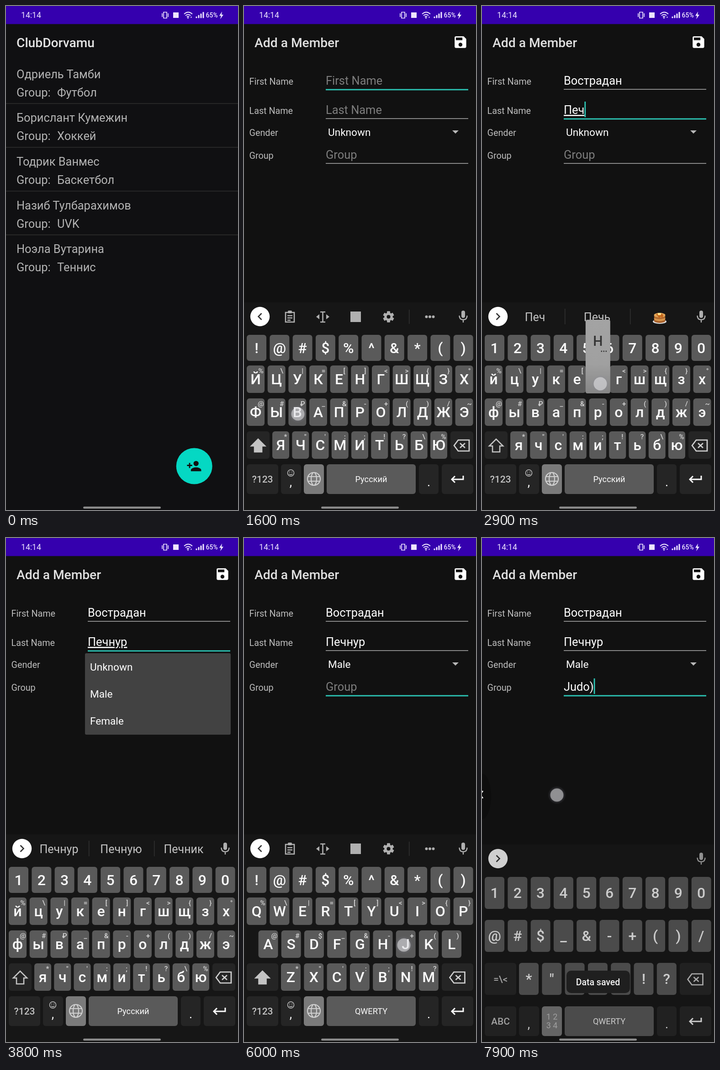
An HTML page for the animation above (8 s loop, 508 px wide and 1102 px high).

```html
<!DOCTYPE html>
<html lang="ru">
<head>
<meta charset="utf-8">
<title>Member form</title>
<style>
html, body { margin: 0; width: 100%; height: 100%; overflow: hidden; background: #111; }
svg { display: block; width: 100vw; height: 100vh; }
text { font-family: Roboto, "Noto Sans", sans-serif; white-space: pre; }
.key { font-weight: 500; }
</style>
</head>
<body>
<svg id="stage" viewBox="0 0 508 1102"></svg>
<script>
const LOOP = 8000, STEP = 100, TEAL = '#2cc6b6';
const stage = document.getElementById('stage');

// Markup helpers
const esc = s => s.replace(/&/g, '&amp;').replace(/</g, '&lt;');
const text = (x, y, s, size, fill, more = '') =>
  `<text x="${x}" y="${y}" font-size="${size}" fill="${fill}" ${more}>${esc(s)}</text>`;
const mid = (x, cy, s, size, fill, more = '') =>
  text(x, cy + size * 0.355, s, size, fill, 'text-anchor="middle" ' + more);
const rect = (x, y, w, h, fill, r = 0, more = '') =>
  `<rect x="${x}" y="${y}" width="${w}" height="${h}" rx="${r}" fill="${fill}" ${more}/>`;
const circle = (x, y, r, fill, more = '') =>
  `<circle cx="${x}" cy="${y}" r="${r}" fill="${fill}" ${more}/>`;
const line = (d, color, w, more = '') =>
  `<path d="${d}" fill="none" stroke="${color}" stroke-width="${w}" ${more}/>`;
const shape = (d, fill, more = '') => `<path d="${d}" fill="${fill}" ${more}/>`;
const group = (id, body, more = '') => `<g id="${id}" ${more}>${body}</g>`;
const at = (x, y, body, k = 1) => `<g transform="translate(${x} ${y}) scale(${k})">${body}</g>`;

// Status bar
function statusBar() {
  const c = '#eee6ff';
  const bars = [0, 1, 2, 3].map(i => rect(415.5 + i * 5, 23 - i * 3.3, 3, 3.5 + i * 3.3, c, 1)).join('');
  return rect(0, 0, 508, 39.5, '#3500ae') + text(33, 26.2, '14:14', 17.6, c) +
    line('M345 13.5h7v13h-7zM342 16v8M355 16v8', c, 1.7) +
    rect(366, 14, 12, 12, c) +
    line('M390 17.5q9 -8 18 0M393 21q6 -5 11 0M396 24q3 -2.5 5 0', c, 1.9) +
    circle(398.5, 26, 1.5, c) + circle(405.5, 24.5, 1.2, c) + bars +
    text(437.5, 24.5, '65%', 14, c, 'font-weight="500"') +
    shape('M473 12l-6 9.5h4l-2 7.5 7-10h-4z', c);
}

// List screen
const people = [
  ['Одриель Тамби', 'Футбол'], ['Борислант Кумежин', 'Хоккей'], ['Тодрик Ванмес', 'Баскетбол'],
  ['Назиб Тулбарахимов', 'UVK'], ['Ноэла Вутарина', 'Теннис']
];
function listScreen() {
  const c = '#b4b4b4';
  const rows = people.map(([name, sport], i) => {
    const y = i * 95.7;
    return text(23, 157.6 + y, name, 25.4, c) + text(23, 197.6 + y, 'Group:', 25.4, c) +
      text(112, 197.6 + y, sport, 25.4, c) + (i < 4 ? rect(0, 212.5 + y, 508, 1.6, '#2d2d2d') : '');
  }).join('');
  const add = 'M15 12a4 4 0 1 0 0-8 4 4 0 0 0 0 8zM6 10V7H4v3H1v2h3v3h2v-3h3v-2zM15 14c-2.7 0-8 1.3-8 4v2h16v-2c0-2.7-5.3-4-8-4z';
  return rect(0, 0, 508, 1102, '#101012') + text(23, 90, 'ClubDorvamu', 28.2, '#e4e4e4', 'font-weight="500"') +
    rows + circle(412.2, 1006, 39.5, '#05d8c3') + at(395, 989, shape(add, '#111'), 1.411);
}

// Form screen
const fields = [
  { label: 'First Name', base: 172, rule: 181.5 },
  { label: 'Last Name', base: 236, rule: 245.5 },
  { label: 'Group', base: 334, rule: 343.5 }
];
function formScreen() {
  const save = 'M17 3H5a2 2 0 0 0-2 2v14a2 2 0 0 0 2 2h14a2 2 0 0 0 2-2V7zM12 19a3 3 0 1 1 0-6 3 3 0 0 1 0 6zM15 9H5V5h10z';
  return rect(0, 0, 508, 1102, '#111') + text(23, 90, 'Add a Member', 28.2, '#e0e0e0', 'font-weight="500"') +
    at(457, 62, shape(save, '#fff', 'fill-rule="evenodd"'), 1.411) +
    fields.map((f, i) => text(11.5, f.base - 0.5, f.label, 19.76, '#bcbcbc') +
      text(179, f.base, '', 25.4, '#fff', `id="value${i}"`) +
      rect(179, f.rule, 312, 1.4, '#b8b8b8', 0, `id="rule${i}"`)).join('') +
    text(11.5, 283.5, 'Gender', 19.76, '#bcbcbc') + text(184, 284, '', 22.6, '#fff', 'id="gender"') +
    shape('M456 272h14l-7 7z', '#b8b8b8') + rect(0, 0, 2.8, 34, TEAL, 0, 'id="caret"');
}
const menu = () => rect(173, 252, 319, 178, '#424242', 3) +
  ['Unknown', 'Male', 'Female'].map((s, i) => text(184, 290 + i * 59, s, 22.6, '#fff')).join('');

// Keyboard
const KEY = '#5a5a5a', DARK = '#252525', INK = '#fafafa', GREY = '#b0b0b0', BOLD = 'class="key"';
const keyBox = {};
const keyRow = (labels, x, step, w, y, h, hints = []) => [...labels].map((s, i) => {
  const kx = x + i * step;
  keyBox[s] = [kx, y, w];
  return rect(kx, y, w, h, KEY, 6) + mid(kx + w / 2, y + h / 2, s, 32, INK, BOLD) +
    (hints[i] ? mid(kx + w - 8, y + 11, hints[i], 15.5, '#d4d4d4', BOLD) : '');
}).join('');
const shiftKey = (w, on) => rect(6, 930, w, 60, DARK, 6) +
  at(6 + w / 2, 961, `<path d="M0 -14L-15 1H-8V14H8V1H15Z" fill="${on ? '#c4c4c4' : 'none'}" stroke="#c4c4c4" stroke-width="2.6"/>`);
const backKey = (x, y, h) => rect(x, y, 502 - x, h, DARK, 6) +
  at((x + 502) / 2, y + h / 2 + 1, line('M-17 0L-8 -12H16V12H-8ZM-4 -5L7 5M7 -5L-4 5', '#d0d0d0', 2.7));
function bottomRow(left, label, symbols) {
  const g = '#c4c4c4';
  return rect(6, 1002, 69, 65, DARK, 6) + mid(40.5, 1035, left, 21, g, BOLD) +
    rect(81, 1002, 44, 65, DARK, 6) + text(102.5, 1050, ',', 27, INK, 'text-anchor="middle"') +
    rect(131, 1002, 44, 65, '#7a7a7a', 6) +
    (symbols ? mid(153, 1025, '1 2', 18, g) + mid(153, 1044, '3 4', 18, g)
      : line('M139 1034a14 14 0 1 0 28 0a14 14 0 1 0 -28 0M147 1034a6 14 0 1 0 12 0a6 14 0 1 0 -12 0M141 1029h24M141 1039h24', '#d0d0d0', 2.2) +
        circle(102.5, 1021, 7, 'none', `stroke="${g}" stroke-width="1.5"`) + line('M99 1023q3.5 4 7 0M100 1018v2M105 1018v2', g, 1.5)) +
    rect(181, 1002, 195, 65, KEY, 6) + mid(278.5, 1035, label, 18.2, INK) +
    rect(383, 1002, 43, 65, DARK, 6) + text(404.5, 1050, '.', 27, INK, 'text-anchor="middle"') +
    rect(433, 1002, 69, 65, DARK, 6) + line('M480 1027v8h-25m7 -7l-7 7l7 7', INK, 3);
}
const topKeys = caps => keyRow(caps ? '!@#$%^&*()' : '1234567890', 6, 50.3, 43, 719, 57);
function russian(caps) {
  const c = s => caps ? s.toUpperCase() : s;
  return topKeys(caps) + keyRow(c('йцукенгшщзх'), 6, 45.66, 39, 786, 60, '%\\|=[]<>{}°') +
    keyRow(c('фывапролджэ'), 6, 45.66, 39, 858, 60, '@#₽_&-+()/~') +
    shiftKey(50, caps) + keyRow(c('ячсмитьбю'), 62, 43.25, 37, 930, 60, '*"\':;!?\\%') +
    backKey(452, 930, 60) + bottomRow('?123', 'Русский');
}
function latin(caps) {
  const c = s => caps ? s.toUpperCase() : s;
  return topKeys(caps) + keyRow(c('qwertyuiop'), 6, 50.3, 43, 786, 60, '%\\|=[]<>{}') +
    keyRow(c('asdfghjkl'), 31.5, 50.2, 43, 858, 60, '@#$_&-+()') +
    shiftKey(69, caps) + keyRow(c('zxcvbnm'), 81, 50.3, 43, 930, 60, '*"\':;!?') +
    backKey(433, 930, 60) + bottomRow('?123', 'QWERTY');
}
const symbols = () => keyRow('1234567890', 6, 50.3, 43, 719, 70) + keyRow('@#$_&-+()/', 6, 50.3, 43, 813, 70) +
  rect(6, 907, 69, 70, DARK, 6) + mid(40.5, 943, '=\\<', 21, '#c4c4c4', BOLD) +
  keyRow('*"\':;!?', 81, 50.3, 43, 907, 70) + backKey(433, 907, 70) + bottomRow('ABC', 'QWERTY', true);

function tools() {
  const teeth = [0, 60, 120].map(a => rect(-3.4, -12.2, 6.8, 24.4, GREY, 1, `transform="rotate(${a})"`)).join('');
  return line('M91 670h19v21h-19zM95 677h11M95 682h11M95 687h7', GREY, 2.6) + rect(96, 666, 9, 6, GREY, 2) +
    line('M172.5 669v22M167 669h11M167 691h11', GREY, 2.6) + shape('M165 674v11l-7 -5.5zM180 674v11l7 -5.5z', GREY) +
    rect(233, 668, 23, 23, GREY) +
    at(316.5, 679.5, teeth + circle(0, 0, 9.2, GREY) + circle(0, 0, 4, '#161616')) +
    rect(361, 664, 1.4, 31, '#333') + [399.5, 407, 414.5].map(x => circle(x, 679.5, 3, GREY)).join('');
}
const pancakes = () => at(389, 682, `<ellipse cy="8" rx="15" ry="5" fill="#dadada"/>` +
  ['#a8602a', '#d9964a', '#b06a30', '#e0a458'].map((c, i) => `<ellipse cy="${6 - i * 4}" rx="12.5" ry="5" fill="${c}"/>`).join('') +
  shape('M-8 -8q8 -4 16 1l-2 8l-3 -4l-4 3z', '#c4651a') + rect(-4, -11, 7, 5, '#ffe08a', 1));
const suggestions = () => [116, 252, 389].map((x, i) => text(x, 689, '', 25, '#c4c4c4', `id="word${i}" text-anchor="middle"`)).join('') +
  rect(181, 662, 1.4, 34, '#333') + rect(324, 662, 1.4, 34, '#333') + group('cakes', pancakes());

const layouts = { ru: russian(false), RU: russian(true), en: latin(false), EN: latin(true), sym: symbols() };
const keyboard = () => rect(0, 648, 508, 454, '#161616') +
  circle(35, 679, 21.2, '#fff') + line('', '#333', 2.6, 'id="chevron"') +
  rect(476, 666, 8, 16, GREY, 4) + line('M471.5 677q0 9 8.5 9t8.5 -9M480 686v6', GREY, 2.4) +
  group('tool', tools()) + group('sug', suggestions()) +
  Object.entries(layouts).map(([id, body]) => group(id, body)).join('') +
  group('popup', rect(-27, -100, 54, 161, 'url(#pop)', 4) + mid(0, -57, '', 40, '#333', 'id="popChar"') +
    [8, 13, 18].map(x => circle(x, -31, 1.4, '#333')).join(''));

stage.innerHTML = `<defs>
  <linearGradient id="pop" x2="0" y2="1"><stop stop-color="#a3a3a3"/><stop offset=".6" stop-color="#a0a0a0"/><stop offset="1" stop-color="#868686"/></linearGradient>
  <radialGradient id="halo"><stop offset=".6" stop-color="#889" stop-opacity=".3"/><stop offset="1" stop-color="#889" stop-opacity="0"/></radialGradient></defs>` +
  group('list', listScreen()) + group('form', formScreen()) + group('menu', menu()) + group('keys', keyboard()) +
  group('toast', rect(185, 946, 139, 49, '#1f1f1f', 10) + mid(254, 971, 'Data saved', 19.5, '#f4f4f4', 'font-weight="500"')) +
  group('back', `<ellipse cx="0" cy="565" rx="20" ry="50" fill="#000" opacity=".25"/>` + line('M2 553L-4 561L2 569', '#fff', 2.4)) +
  rect(169, 1094.5, 170, 4.6, '#8c8c8c', 2.3) + statusBar() +
  group('dot', circle(0, 0, 20, 'url(#halo)') + circle(0, 0, 14.5, '#fff', 'opacity=".45"'));

const el = {};
stage.querySelectorAll('[id]').forEach(n => el[n.id] = n);

// Timelines: [start, value...]
const layoutAt = [[0, 'ru'], [1600, 'RU'], [1800, 'ru'], [2500, 'RU'], [2700, 'ru'], [5300, 'en'], [5700, 'EN'], [6200, 'en'], [6600, 'sym']];
const stripAt = [[0, 'tool'], [1800, 'sug'], [2200, 'tool'], [2700, 'sug'], [4700, 'tool'], [6200, 'sug'], [6800, 'none']];
const wordsAt = [[0, 'В', 'Во', 'Вы'], [1900, 'Во', 'Вот', 'Вода'], [2000, 'Вос', 'Вострадан', 'Восемь'], [2700, 'П', 'По', 'При'],
  [2800, 'Пе', 'Перед', 'Пен'], [2900, 'Печ', 'Печь', ''], [3000, 'Печн', 'Печной', 'Печник'], [3200, 'Печну', 'Печную', 'Печь'],
  [3300, 'Печнур', 'Печную', 'Печник'], [6200, 'J', 'Just', 'Jump'], [6300, 'Ju', 'Just', 'June'], [6400, 'Jud', 'Judge', 'Judo'], [6500, 'Judo', 'Judge', 'Jude']];
const focusAt = [[0, 0], [2200, 1], [4700, 2]];
const typed = [
  [[0, ''], [1800, 'В'], [1900, 'Во'], [2000, 'Вос'], [2100, 'Вострадан']],
  [[0, ''], [2700, 'П'], [2800, 'Пе'], [2900, 'Печ'], [3000, 'Печн'], [3200, 'Печну'], [3300, 'Печнур']],
  [[0, ''], [6200, 'J'], [6300, 'Ju'], [6400, 'Jud'], [6500, 'Judo'], [6800, 'Judo)']]
];
const blinkFrom = [[0, 0], [1000, 1000], [1800, 1800], [2100, 2100], [2200, 1700], [2500, 2500], [2900, 2900], [3300, 3300],
  [4700, 4700], [5300, 5300], [6200, 6200], [6500, 6500], [6800, 6800]];
// Touches: [start, x, y, key]
const taps = [[200, 412, 1006], [1000, 255, 157], [1500, 32, 962], [1600, 118, 892, 'В'], [1700, 300, 892, 'о'], [1800, 168, 964, 'с'],
  [2000, 254, 682], [2150, 270, 228], [2450, 32, 962], [2500, 210, 892, 'П'], [2600, 210, 820, 'е'], [2700, 126, 964, 'ч'],
  [2800, 259, 826, 'н'], [3000, 119, 822, 'у'], [3100, 256, 893, 'р'], [3500, 318, 277], [4500, 270, 341], [4600, 318, 320],
  [5100, 153, 1036], [5600, 41, 962], [6000, 350, 890, 'J'], [6100, 330, 820, 'u'], [6200, 154, 892, 'd'], [6300, 432, 820, 'o'],
  [6450, 42, 1036], [6600, 432, 852, ')'], [7200, 474, 80]];

const last = (table, t) => table.findLast(e => e[0] <= t);
const span = (t, a, b) => Math.min(1, Math.max(0, (t - a) / (b - a)));
const out = p => 1 - (1 - p) ** 3;
const show = (n, on) => n.style.display = on ? '' : 'none';
const set = (n, attrs) => { for (const k in attrs) n.setAttribute(k, attrs[k]); };

function drawForm(t, strip) {
  const focus = last(focusAt, t)[1];
  fields.forEach((f, i) => {
    const s = last(typed[i], t)[1], on = i === focus, v = el['value' + i];
    v.textContent = s || f.label;
    set(v, { fill: s ? '#fff' : '#7d7d7d', 'text-decoration': s && on && strip === 'sug' ? 'underline' : 'none' });
    set(el['rule' + i], { height: on ? 2.8 : 1.4, fill: on ? TEAL : '#b8b8b8' });
    if (on) set(el.caret, { x: 179 + (s ? v.getComputedTextLength() : 0), y: f.base - 27 });
  });
  el.gender.textContent = t < 4600 ? 'Unknown' : 'Male';
  show(el.caret, (t - last(blinkFrom, t)[1]) % 1000 < 500 && !(t >= 3600 && t < 4700));
  const open = out(span(t, 3500, 3800)) * (1 - span(t, 4500, 4700));
  set(el.menu, { opacity: open, transform: `translate(0 ${252 * (1 - open) * 0.15}) scale(1 ${0.85 + 0.15 * open})` });
  show(el.menu, open > 0);
}

function drawKeys(t, strip) {
  const drop = t < 7800 ? 110 * (1 - out(span(t, 1200, 1600))) : (t - 7800) * 0.22;
  set(el.keys, { transform: `translate(0 ${drop})`, opacity: 1 - drop / 110 });
  const layout = last(layoutAt, t)[1];
  Object.keys(layouts).forEach(id => show(el[id], id === layout));
  show(el.tool, strip === 'tool');
  show(el.sug, strip === 'sug');
  set(el.chevron, { d: strip === 'tool' ? 'M38.5 672l-7 7l7 7' : 'M31.5 672l7 7l-7 7' });
  const words = last(wordsAt, t).slice(1);
  words.forEach((w, i) => el['word' + i].textContent = w);
  show(el.cakes, !words[2]);
  const held = taps.find(p => p[3] && p[0] === t - STEP);
  show(el.popup, held);
  if (held) {
    const [x, y, w] = keyBox[held[3]];
    set(el.popup, { transform: `translate(${x + w / 2} ${y})` });
    el.popChar.textContent = held[3];
  }
}

function drawTouch(t) {
  const swipe = t >= 7800;
  const tap = swipe ? [7800, 66 + (t - 7800) * 0.98, 562] : taps.findLast(p => p[0] <= t && t < p[0] + 300);
  show(el.dot, tap);
  show(el.back, t >= 7900);
  if (tap) set(el.dot, { transform: `translate(${tap[1]} ${tap[2]})`, opacity: t - tap[0] < 200 ? 1 : 0.04 });
}

function draw(t) {
  const slide = out(span(t, 300, 900)), strip = last(stripAt, t)[1];
  set(el.list, { transform: `translate(${-127 * slide} 0)`, opacity: 1 - 0.5 * slide });
  set(el.form, { transform: `translate(${508 * (1 - slide)} 0)` });
  show(el.list, slide < 1);
  show(el.form, slide > 0);
  drawForm(t, strip);
  drawKeys(t, strip);
  drawTouch(t);
  set(el.toast, { opacity: span(t, 7300, 7600) });
}

const start = performance.now();
function tick() {
  draw(Math.floor((performance.now() - start) % LOOP / STEP) * STEP);
  requestAnimationFrame(tick);
}
tick();
</script>
</body>
</html>
```
